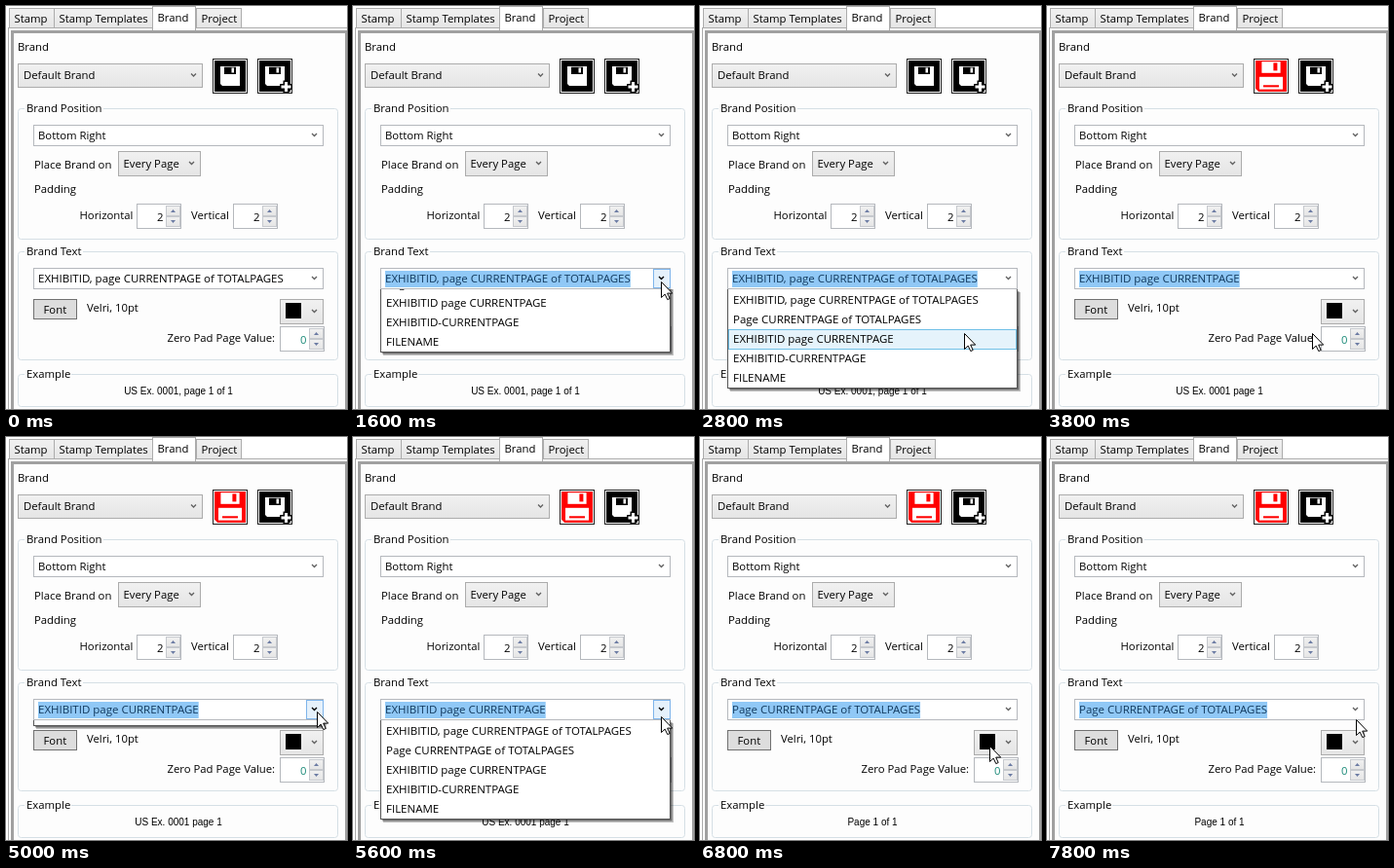
Animation of 350 by 414 pixels, one loop 8 s. Source, as an HTML page:

```html
<!DOCTYPE html>
<html lang="en">
<head>
<meta charset="utf-8">
<title>Brand settings</title>
<style>
html, body { margin: 0; width: 100%; height: 100%; overflow: hidden; background: #fff; }
svg { display: block; }
text { font: 11.34px "Open Sans", "Noto Sans", sans-serif; fill: #000; white-space: pre; }
.option { font-size: 11.49px; }
.example { font: 10px "Liberation Sans", sans-serif; text-anchor: middle; }
</style>
</head>
<body>
<svg id="stage" width="350" height="414" viewBox="0 0 350 414">
  <defs>
    <linearGradient id="face" x1="0" y1="0" x2="0" y2="1">
      <stop offset="0" stop-color="#f1f1f1"/><stop offset="1" stop-color="#e5e5e5"/>
    </linearGradient>
    <clipPath id="below"><rect x="0" y="291" width="350" height="123"/></clipPath>
  </defs>
  <g id="form"></g>
  <g id="live"></g>
  <g clip-path="url(#below)"><g id="popup"></g></g>
  <path id="cursor" d="M.5 .5V16.5L4.2 13.1L6.8 18.6L9.2 17.5L6.7 12.1H11.7Z" fill="#fff" stroke="#000"/>
</svg>
<script>
const LOOP = 8000, STEP = 200;
const OPTIONS = [
  "EXHIBITID, page CURRENTPAGE of TOTALPAGES",
  "Page CURRENTPAGE of TOTALPAGES",
  "EXHIBITID page CURRENTPAGE",
  "EXHIBITID-CURRENTPAGE",
  "FILENAME"
];
const EXAMPLES = ["US Ex. 0001, page 1 of 1", "Page 1 of 1", "US Ex. 0001 page 1"];

// time, x, y
const PATH = [
  [1000, 338, 299], [1200, 316, 283], [1800, 316, 283], [2000, 319, 285],
  [2800, 271, 336], [3800, 272, 336], [4800, 319, 282], [5400, 319, 282],
  [6200, 297, 317], [6800, 297, 317], [7800, 317, 290]
];
// time, chosen option
const CHOICE = [[0, 0], [3200, 2], [6800, 1]];
// time, distance the list is still tucked up (null = closed)
const LIST = [[0, null], [1600, 37], [1800, 0], [3200, null], [5000, 96], [5200, 0], [6800, null]];

const $ = id => document.getElementById(id);

function add(parent, tag, attrs, content) {
  const el = document.createElementNS("http://www.w3.org/2000/svg", tag);
  for (const k in attrs) el.setAttribute(k, attrs[k]);
  if (content !== undefined) el.textContent = content;
  return parent.appendChild(el);
}

// Crisp one-pixel outline from edge to edge
function box(parent, x1, y1, x2, y2, fill, stroke, rx = 0) {
  return add(parent, "rect", {
    x: x1 + .5, y: y1 + .5, width: x2 - x1 - 1, height: y2 - y1 - 1, fill, stroke, rx
  });
}
const fill = (parent, x, y, width, height, color) =>
  add(parent, "rect", { x, y, width, height, fill: color });
const label = (parent, x, mid, str, color = "#000") =>
  add(parent, "text", { x, y: mid + 4, style: "fill:" + color }, str);
const option = (parent, x, mid, str) =>
  add(parent, "text", { x, y: mid + 4, class: "option" }, str);
const chevron = (parent, x, y, color = "#606060") =>
  add(parent, "path", {
    d: `M${x - 2.5} ${y - 1.5}l2.5 2.5l2.5 -2.5`, fill: "none", stroke: color, "stroke-width": 1.3
  });

const form = $("form"), live = $("live"), popup = $("popup");

function tab(x1, x2, str, active) {
  box(form, x1, active ? 0 : 2, x2, active ? 27 : 23, active ? "#fff" : "url(#face)", "#acacac");
  label(form, x1 + 5.5, active ? 12 : 13, str);
}

function group(y1, y2, title, gap) {
  box(form, 12, y1, 341, y2, "none", "#d5dfe5", 3);
  fill(form, 19, y1 - 1, gap, 3, "#fdfdfd");
  label(form, 21, y1, title);
}

function combo(x1, y1, x2, y2, str, dx, button) {
  box(form, x1, y1, x2, y2, button ? "url(#face)" : "#fff", button ? "#acacac" : "#b5b8bd");
  const mid = (y1 + y2) / 2 - .5;
  label(form, x1 + dx, mid, str);
  chevron(form, x2 - 9.5, mid);
}

function spinner(x, y, str, color) {
  box(form, x, y, x + 46, y + 26, "#fff", "#b5b8bd");
  label(form, x + 21, y + 13.5, str, color);
  for (const [dy, d] of [[2, "l2.5 -3l2.5 3z"], [13, "l2.5 3l2.5 -3z"]]) {
    box(form, x + 30, y + dy, x + 45, y + dy + 11, "url(#face)", "#c6c9ce");
    const ay = y + dy + (dy === 2 ? 7 : 4);
    add(form, "path", { d: `M${x + 35} ${ay}${d}`, fill: "#6b7ba3" });
  }
}

// Floppy on a 20 x 20 grid: body, shutter with slot
function disk(parent, x, y, scale, color, back) {
  const g = add(parent, "g", { transform: `translate(${x} ${y}) scale(${scale})` });
  add(g, "path", { d: "M0 0H20V20H2L0 18Z", fill: color });
  fill(g, 4, .7, 12, 7.3, back);
  fill(g, 11.5, 1.5, 2.5, 5, color);
  return g;
}

function saveButton(parent, x, red) {
  box(parent, x, 54, x + 36, 90, "#fff", "#222");
  if (red) {
    const g = disk(parent, x + 2, 56, 1.6, "#f00", "#fff");
    fill(g, 2.5, 10.5, 15, 8, "#fff");
    fill(g, 5, 15.8, 10, 1.3, "#f00");
  } else {
    fill(parent, x + 2, 56, 32, 32, "#000");
    disk(parent, x + 8, 62, 1, "#fff", "#000");
  }
}

function buildForm() {
  fill(form, 0, 0, 350, 414, "#fff");
  box(form, 2, 22, 360, 430, "#fff", "#acacac");
  tab(3, 50, "Stamp");
  tab(49, 151, "Stamp Templates");
  tab(195, 242, "Project");
  tab(150, 195, "Brand", true);
  fill(form, 5, 25, 345, 389, "#a0a0a0");
  fill(form, 8, 28, 340, 386, "#fdfdfd");

  label(form, 12, 42, "Brand");
  combo(12, 59, 202, 84, "Default Brand", 6, true);
  saveButton(form, 258);
  add(form, "path", { d: "M287.5 76.5V89.5M281 83H294", stroke: "#000", "stroke-width": 6 });
  add(form, "path", { d: "M287.5 78V88M282.5 83H292.5", stroke: "#fff", "stroke-width": 3 });

  group(105, 240, "Brand Position", 81);
  combo(28, 122, 326, 144, "Bottom Right", 5);
  label(form, 29, 163, "Place Brand on");
  combo(115, 149, 200, 175, "Every Page", 5.5, true);
  label(form, 29, 188, "Padding");
  label(form, 75.5, 215, "Horizontal");
  spinner(134, 203, "2");
  label(form, 190, 215, "Vertical");
  spinner(233, 203, "2");

  group(252, 364, "Brand Text", 60);
  box(form, 28, 301, 73, 322, "#ddd", "#707070");
  label(form, 38.5, 312, "Font");
  label(form, 83, 310, "Velri, 10pt");
  combo(281, 301, 326, 327, "", 0, true);
  fill(form, 287, 305, 16, 16, "#000");
  label(form, 165.5, 341, "Zero Pad Page Value:");
  spinner(281, 329, "0", "#1a8a78");

  group(378, 412, "Example", 48);
}

buildForm();

const blackSave = add(live, "g", {}), redSave = add(live, "g", {});
saveButton(blackSave, 212);
saveButton(redSave, 212, true);
box(live, 28, 269, 326, 291, "#fff", "#b5b8bd");
const marked = fill(live, 33, 272, 0, 17, "#90c8f6");
const hot = box(live, 308, 270, 326, 290, "#e5f1fb", "#7eb4ea");
const arrow = chevron(live, 316.5, 279.5);
const field = option(live, 33, 280, "");
const example = add(live, "text", { x: 177, y: 399, class: "example" });

fill(popup, 31, 294, 298, 102, "rgba(0,0,0,.25)");
fill(popup, 30, 293, 297.5, 101.5, "rgba(0,0,0,.4)");
box(popup, 28, 290, 326, 393, "#fff", "#555");
const hover = box(popup, 29, 292, 325, 313, "#e5f3fb", "#70c0e7");
OPTIONS.forEach((str, i) => option(popup, 34, 302 + 20 * i, str));

const show = (el, on) => el.setAttribute("visibility", on ? "visible" : "hidden");
const at = (table, t) => table.filter(row => row[0] <= t).pop()[1];

function pointer(t) {
  const next = PATH.findIndex(p => p[0] > t);
  if (next === 0) return null;
  if (next < 0) return PATH[PATH.length - 1].slice(1);
  const [t0, x0, y0] = PATH[next - 1], [t1, x1, y1] = PATH[next];
  const u = (t - t0) / (t1 - t0), e = u * u * (3 - 2 * u);
  return [x0 + (x1 - x0) * e, y0 + (y1 - y0) * e].map(Math.round);
}

function draw(t) {
  const choice = at(CHOICE, t), tuck = at(LIST, t), pos = pointer(t);
  const [px, py] = pos || [-99, -99];
  const open = tuck !== null;

  field.textContent = OPTIONS[choice];
  example.textContent = EXAMPLES[choice];
  const selected = t >= 1600;
  marked.setAttribute("width", selected ? field.getComputedTextLength() : 0);
  field.style.fill = selected ? "#123a5e" : "#000";

  show(blackSave, t < 3200);
  show(redSave, t >= 3200);

  const over = px >= 308 && px < 326 && py >= 270 && py < 290;
  show(hot, over);
  arrow.setAttribute("stroke", over ? "#000" : "#606060");

  show(popup, open);
  if (open) popup.setAttribute("transform", `translate(0 ${-tuck})`);
  const row = Math.floor((py - 293) / 20);
  show(hover, open && tuck === 0 && row >= 0 && row < OPTIONS.length);
  hover.setAttribute("y", 292.5 + 20 * row);

  show($("cursor"), pos);
  $("cursor").setAttribute("transform", `translate(${px} ${py})`);
}

const start = performance.now();
function tick(now) {
  const t = Math.max(0, now - start) % LOOP;
  draw(Math.floor(t / STEP) * STEP);
  requestAnimationFrame(tick);
}
draw(0);
requestAnimationFrame(tick);
</script>
</body>
</html>
```
